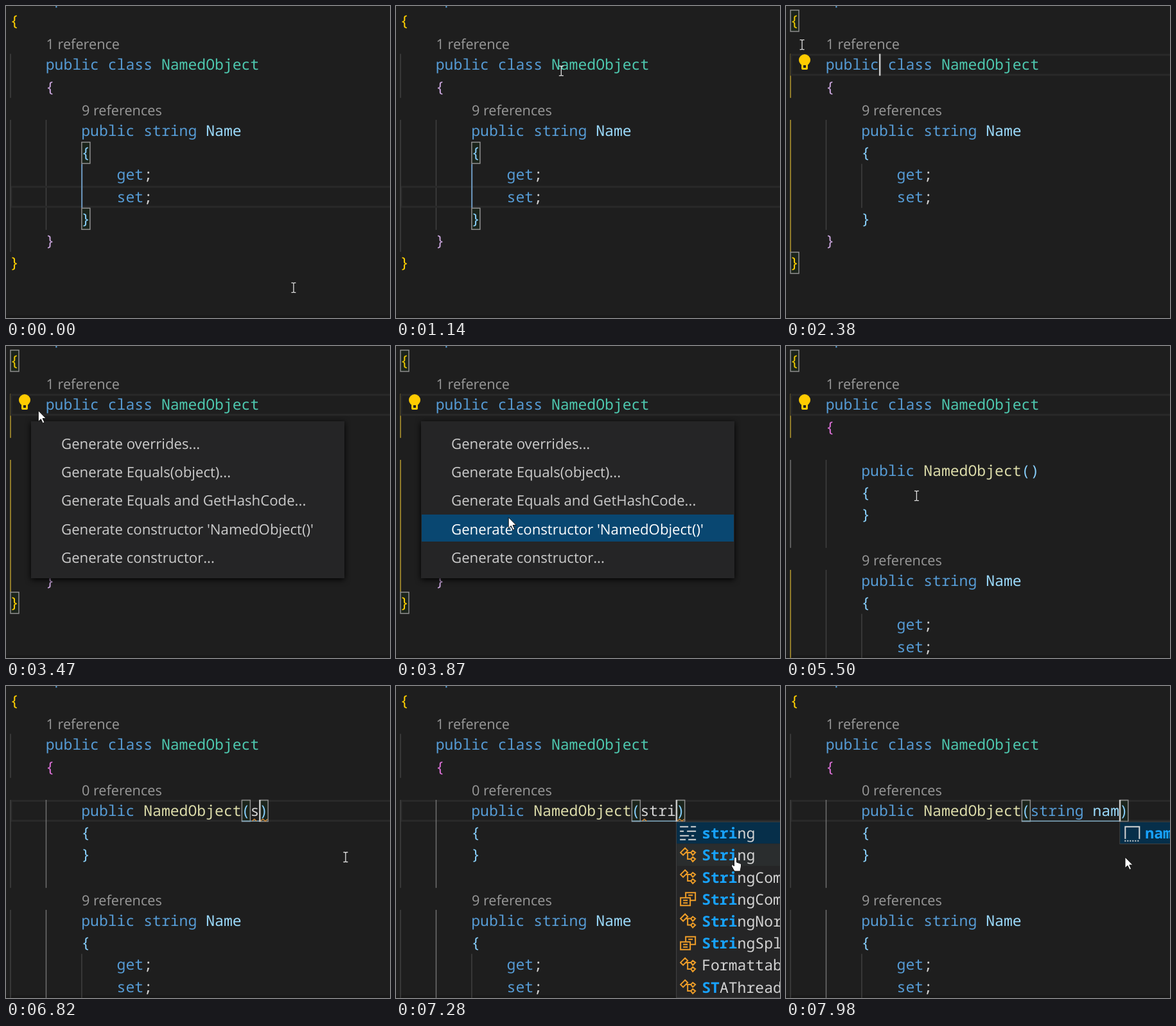
Write an HTML page that moves like this. It is 598 px wide and 485 px high and loops after 8 s.

```html
<!DOCTYPE html>
<html lang="en">
<head>
<meta charset="utf-8">
<title>Generate constructor</title>
<style>
html, body { margin: 0; width: 100%; height: 100%; overflow: hidden; background: #1e1e1e; }
svg { display: block; width: 598px; height: 485px; }
text { white-space: pre; text-rendering: geometricPrecision; }
.code { font: 500 23.1px "Noto Sans Mono", monospace; fill: #d4d4d4; }
.lens { font: 21.7px "Open Sans", sans-serif; fill: #999; }
.lens.hover { fill: #4e94ce; }
.item { font: 22.2px "Open Sans", sans-serif; fill: #ccc; }
.item.active { fill: #fff; }
.kw { fill: #569cd6; }
.type { fill: #4ec9b0; }
.method { fill: #dcdcaa; }
.var { fill: #9cdcfe; }
.gold { fill: #ffd000; }
.lilac { fill: #c9a5dc; }
.pink { fill: #da70d6; }
.sky { fill: #87cefa; }
.hit { fill: #18a3ff; font-weight: 700; }
.box { fill: #00640018; stroke: #8f8f8f; stroke-width: 1.5; }
.pair { fill: none; stroke: #7fa9c0; stroke-width: 1.5; }
.line { fill: none; stroke: #292929; stroke-width: 3; }
.icon { fill: none; stroke: #d4d4d4; stroke-width: 2; }
.icon.orange { stroke: #ee9d28; }
.squiggle { fill: none; stroke: #d08a3a; stroke-width: 1.5; }
.menu { filter: drop-shadow(0 2px 5px #000); }
</style>
</head>
<body>
<svg id="stage" viewBox="0 0 598 485"></svg>
<script>
const LOOP = 8000, LINE = 34.2, CELL = 13.86;
const top_ = row => 6 + LINE * row;
const left = col => 7 + CELL * col;

// Markup helpers
const span = (cls, s) => `<tspan class="${cls}">${s}</tspan>`;
const code = (row, col, s) => `<text class="code" x="${left(col) - .7}" y="${top_(row) + 25}">${s}</text>`;
const lens = (row, col, s, cls = '') =>
  `<text class="lens ${cls}" x="${left(col)}" y="${top_(row) + 26.8}">${s}</text>`;
const guide = (col, from, to, color = '#404040', w = 1.5) =>
  `<rect x="${left(col) - .7}" y="${top_(from)}" width="${w}" height="${LINE * (to - from)}" fill="${color}"/>`;
const box = (row, col, id = '') =>
  `<rect ${id} class="box" x="${left(col)}" y="${top_(row) + .5}" width="13" height="33"/>`;
const currentLine = row => `<rect class="line" x="8" y="${top_(row) + 1.5}" width="610" height="31"/>`;
const during = (spans, s) => `<g data-on="${spans}">${s}</g>`;

const property = row =>
  code(row, 8, span('kw', 'public string ') + span('var', 'Name')) +
  code(row + 1, 8, span('sky', '{')) +
  code(row + 2, 12, span('kw', 'get') + ';') +
  code(row + 3, 12, span('kw', 'set') + ';') +
  code(row + 4, 8, span('sky', '}'));

const outerGuides = color => guide(0, 2, 4, color) + guide(0, 5, 11, color);

const shared =
  '<rect y="481" width="598" height="4" fill="#191919"/>' +
  code(-1, 0, span('kw', 'namespace')) + code(0, 0, span('gold', '{')) + lens(1, 4, '1 reference') +
  code(2, 4, span('kw', 'public class ') + span('type', 'NamedObject'));

const before = during('0-5030',
  guide(4, 5, 10) +
  during('0-1540', currentLine(8) + outerGuides('#404040') + guide(8, 7, 9, '#6f9cc4', 2) + box(6, 8) + box(9, 8)) +
  during('1540-5030', outerGuides('#b59a30') + guide(8, 7, 9) + box(11, 0)) +
  code(3, 4, span('lilac', '{')) +
  during('0-330,690-5030', lens(4, 8, '9 references')) +
  during('330-690', lens(4, 8, '9 references', 'hover')) +
  property(5) +
  code(10, 4, span('lilac', '}')) + code(11, 0, span('gold', '}')));

const after = during('5030-8000',
  during('5030-6200',
    guide(0, 2, 4, '#b59a30') + guide(0, 5, 9, '#707070') + guide(0, 10, 14, '#b59a30') +
    guide(4, 5, 9) + guide(4, 10, 14)) +
  during('6200-8000',
    currentLine(5) + guide(0, 2, 4) + guide(0, 5, 9) + guide(0, 10, 14) +
    guide(4, 5, 9, '#707070') + guide(4, 10, 14, '#707070') +
    box(5, 26) + box(5, 27, 'id="close"') + '<path id="pair" class="pair"/>') +
  guide(8, 12, 14) +
  code(3, 4, span('pink', '{')) +
  during('5800-8000', lens(4, 8, '0 references')) +
  code(5, 8, span('kw', 'public ') + span('method', 'NamedObject') + span('sky', '(') +
    '<tspan id="typeName"></tspan><tspan id="param" class="var"></tspan>' + span('sky', ')')) +
  code(6, 8, span('sky', '{')) + code(7, 8, span('sky', '}')) +
  lens(9, 8, '9 references') + property(10) +
  during('6820-7510',
    `<path class="squiggle" d="M${left(27) + 2} 210l3.500-3 3.500 3"/>` +
    '<path id="squiggle" class="squiggle" d="M1 210l4-3 4 3 3-3"/>'));

const bulb = during('1630-6500',
  '<circle cx="29" cy="84" r="9" fill="#fc0"/><path d="M24 89H34V97Q34 99 32 99H26Q24 99 24 97Z" fill="#fc0"/>' +
  '<path d="M27 92h4v4h-4z" fill="#1e1e1e"/>');

const actions = ['Generate overrides...', 'Generate Equals(object)...', 'Generate Equals and GetHashCode...',
  "Generate constructor 'NamedObject()'", 'Generate constructor...'];
const menu = during('2850-4950',
  '<rect class="menu" x="39" y="117" width="488" height="244" fill="#252526"/>' +
  '<rect id="pick" x="40" width="486" height="42" fill="#094771"/>' +
  actions.map((s, i) => `<text class="item" x="86" y="${160 + 44.2 * i}">${s}</text>`).join(''));

// Completion list
const icons = {
  keyword: '<path class="icon" d="M0 2H13M17 2H25M0 9H6M11 9H25M0 16H14M18 16H22M0 22H9M13 22H25"/>',
  class: '<path class="icon orange" d="M1 8L8 1 12 5 5 12ZM9 8H17M12 8V18H17M17 8L20 5 24 8 20 12ZM17 18L20 15 24 18 20 22Z"/>',
  enum: '<path class="icon orange" d="M9 9V2H24V14H17M13 6H20M1 10H16V22H1ZM5 14H12M5 18H12"/>',
  word: '<path class="icon" d="M3 21V2H25V21"/><path class="icon" stroke-dasharray="2 2" d="M2 24H26"/>'
};
const completions = [['keyword', 'string'], ['class', 'String'], ['class', 'StringComparer'],
  ['enum', 'StringComparison'], ['class', 'StringNormalization'], ['enum', 'StringSplitOptions'],
  ['class', 'FormattableString'], ['class', 'STAThreadAttribute']];

function option([icon, label], i, prefix) {
  let n = 0;
  while (n < prefix.length && label[n] && label[n].toLowerCase() === prefix[n]) n++;
  const y = LINE * i;
  return `<g transform="translate(6 ${y + 5.5})">${icons[icon]}</g>` +
    `<text class="code" x="40" y="${y + 26}">${span('hit', label.slice(0, n))}${label.slice(n)}</text>`;
}
function popup(list, prefix) {
  return `<rect x=".5" width="400" height="${LINE * list.length}" fill="#252526" stroke="#454545"/>` +
    `<rect x="1" y=".5" width="399" height="${LINE - 1}" fill="#062f4a"/>` +
    (list.length > 1 ? `<rect x="1" y="${LINE}" width="399" height="${LINE}" fill="#2a2d2e"/>` : '') +
    list.map((entry, i) => option(entry, i, prefix)).join('');
}

const pointers = {
  beam: '<path d="M-3.5-7.5H-1L0-6.5 1-7.5H3.5M0-6.5V6.5M-3.5 7.5H-1L0 6.5 1 7.5H3.5" fill="none" stroke="#e0e0e0" stroke-width="1.3"/>',
  arrow: '<path d="M0 0V17L4 13.2 7 19.5 9.6 18.3 6.8 12.2H12Z" fill="#fff" stroke="#111"/>',
  hand: '<path d="M-2 2Q0-2 2 2V8L8 10Q9.500 11 9 14L7.500 22H-1.500L-6 14Q-7 11-4 12L-2 14Z" fill="#fff" stroke="#111"/>'
};

stage.innerHTML = shared + before + after +
  during('1540-6200', currentLine(2) + box(0, 0)) + bulb +
  '<rect id="caret" width="2.5" height="34" fill="#c8c8c8"/><g id="list"></g>' + menu + '<g id="mouse"></g>';

// Timeline
const path = [[0, 448, 438], [70, 440, 428], [260, 300, 250], [450, 235, 154], [610, 240, 153], [800, 258, 138],
  [1000, 261, 112], [1230, 255, 94], [1450, 240, 94], [1540, 152, 94], [2150, 148, 92], [2380, 25, 60],
  [2620, 34, 84], [2850, 44, 89], [3470, 50, 100], [3700, 115, 200], [3870, 175, 266], [4000, 198, 314],
  [4160, 196, 316], [4330, 191, 312], [4410, 184, 296], [4560, 183, 295], [5190, 184, 297], [5500, 203, 233],
  [5970, 388, 196], [6500, 388, 196], [6650, 529, 266], [8000, 528, 266]];
const holds = [450, 1230, 1540, 2850, 4160, 4560];
const shapes = [[0, 'beam'], [330, 'hand'], [690, 'beam'], [2500, 'hand'], [2920, 'arrow'], [5030, 'beam'],
  [6890, 'hand'], [7590, 'arrow']];
const keys = [6820, 7110, 7200, 7280, 7430, 7510, 7590, 7670, 7820, 7980];
const phrase = 'string nam';

const within = (t, spans) => spans.split(',').some(s => {
  const [a, b] = s.split('-');
  return t >= a && t < b;
});
const timed = [...document.querySelectorAll('[data-on]')];
const items = [...document.querySelectorAll('.item')];
const $ = id => document.getElementById(id);
const put = (el, html) => { if (el.markup !== html) el.innerHTML = el.markup = html; };

function pointerAt(t) {
  const i = Math.max(1, path.findIndex(p => p[0] > t));
  const [t0, x0, y0] = path[i - 1], [t1, x1, y1] = path[i];
  const f = holds.includes(t0) ? 0 : (t - t0) / (t1 - t0);
  return [x0 + (x1 - x0) * f, y0 + (y1 - y0) * f];
}

function draw(t) {
  for (const el of timed) el.style.display = within(t, el.dataset.on) ? '' : 'none';

  const [x, y] = pointerAt(t);
  put($('mouse'), pointers[shapes.filter(s => s[0] <= t).pop()[1]]);
  $('mouse').setAttribute('transform', `translate(${x} ${y})`);

  const active = Math.floor((y - 129.6) / 44.2);
  $('pick').setAttribute('y', 262 + 44.2 * (active - 3));
  $('pick').style.display = active >= 0 ? '' : 'none';
  items.forEach((el, i) => el.classList.toggle('active', i === active));

  const count = keys.filter(k => k <= t).length;
  const typed = phrase.slice(0, count);
  $('typeName').textContent = typed.slice(0, 7);
  $('typeName').setAttribute('class', count > 5 ? 'kw' : '');
  $('param').textContent = typed.slice(7);

  const end = left(27 + count);
  $('close').setAttribute('x', end);
  $('pair').setAttribute('d', `M${left(26)} 210H${end}`);
  $('squiggle').setAttribute('transform', `translate(${end})`);

  const inCtor = t >= 6200;
  $('caret').setAttribute('x', inCtor ? end - 1 : left(10) - .7);
  $('caret').setAttribute('y', top_(inCtor ? 5 : 2));
  $('caret').style.display = within(t, '1540-1860,2360-2850,4950-5450,5950-8000') ? '' : 'none';

  const words = within(t, '6890-7590') ? popup(completions, typed)
    : t >= 7740 ? popup([['word', 'name']], typed.slice(7)) : '';
  put($('list'), words);
  $('list').setAttribute('transform', `translate(${end - .5} 211.2)`);
}

const start = performance.now();
function tick() {
  draw((performance.now() - start) % LOOP);
  requestAnimationFrame(tick);
}
tick();
</script>
</body>
</html>
```
